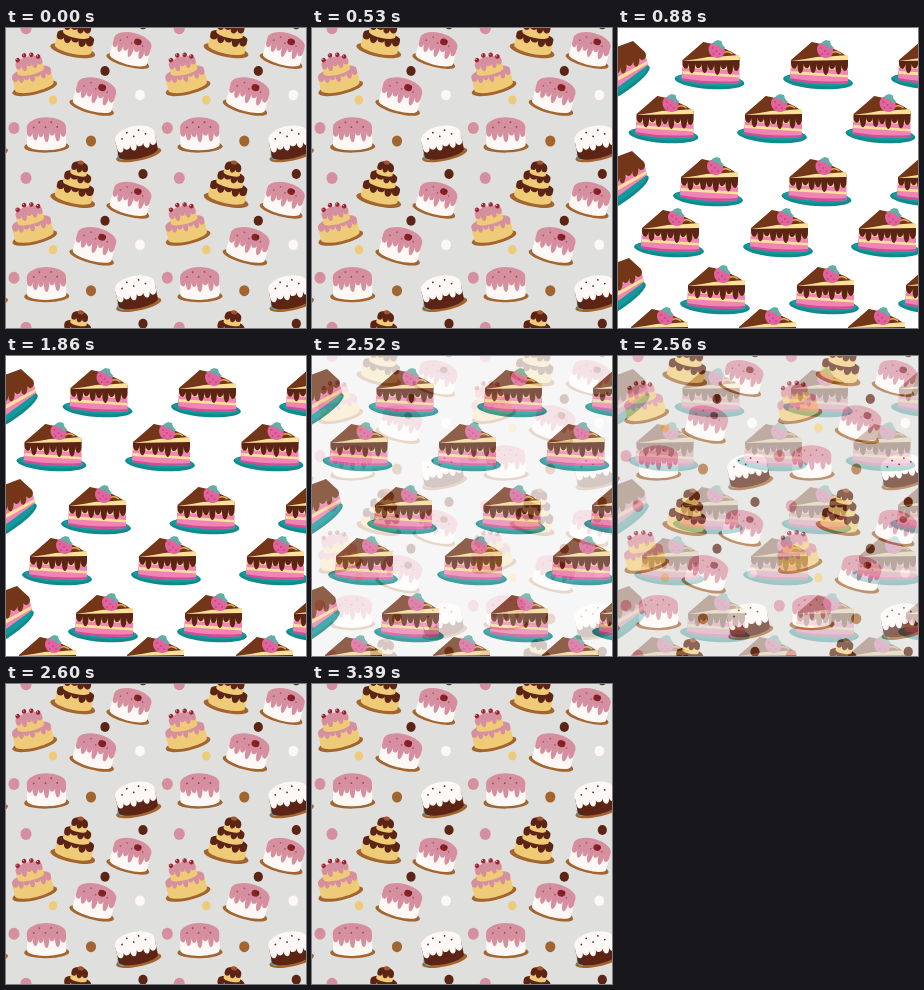
These frames come from a looping animation (300 by 300 pixels, 3920 ms). An HTML page:

```html
<!DOCTYPE html>
<html lang="en">
<head>
<meta charset="utf-8">
<title>Cakes</title>
<style>
html, body { margin: 0; width: 100%; height: 100%; overflow: hidden; background: #fff; }
svg { display: block; width: 100%; height: 100%; }
</style>
</head>
<body>
<svg id="stage" viewBox="0 0 300 300"></svg>
<script>
const PINK = '#d68f9f', CHOC = '#5c2414', GOLD = '#efcb78', WHITE = '#fdf8f5', PLATE = '#a3652f';
const COCOA = '#733619', CREAM = '#fbe19a', ROSE = '#f284b5', TEAL = '#129a9c';

const path = (d, fill) => `<path d="${d}" fill="${fill}"/>`;
const oval = (x, y, rx, ry, fill) => `<ellipse cx="${x}" cy="${y}" rx="${rx}" ry="${ry}" fill="${fill}"/>`;
const at = (x, y, turn, art, scale = 1) =>
  `<g transform="translate(${x} ${y}) rotate(${turn}) scale(${scale})">${art}</g>`;

// Row of soft drips running to the left; slope is the rise per drip.
const drips = (lengths, step, slope = 0) =>
  lengths.map(n => `c0 ${n} ${-step} ${n} ${-step} ${slope}`).join('');

// Cylinder side with a rounded lower edge.
const body = (w, top, bottom, fill) =>
  path(`M${-w} ${top}V${bottom}A${w} ${w * 0.28} 0 0 0 ${w} ${bottom}V${top}Z`, fill);

// Domed top with a short skirt that ends in drips.
const icing = (w, y, dome, skirt, lengths, fill) =>
  path(`M${-w} ${y}A${w} ${dome} 0 0 1 ${w} ${y}v${skirt}` +
    drips(lengths, 2 * w / lengths.length) + 'Z', fill);

const sprinkles = (fill, y) => [-13, -7, -1, 5, 11]
  .map((x, i) => oval(x, y + (i % 2 ? -3 : 2), 0.9, 0.9, fill)).join('');

const plate = (y, rx = 23) => oval(0, y, rx, 6, PLATE);
const cherry = (x, y) => oval(x, y, 2.2, 2.2, '#9c2335') + oval(x - 0.6, y - 0.8, 0.6, 0.6, '#efc1c8');

const tiered = plate(14, 22) +
  body(19, 0, 12, GOLD) + icing(19, -1, 6, 2, [5, 8, 4, 9, 5, 7, 4], PINK) +
  body(13, -12, -3, GOLD) + icing(13, -12, 5, 2, [4, 7, 3, 8, 4], PINK) +
  cherry(-10, -16) + cherry(-3, -19) + cherry(4, -18) + cherry(10, -15);

const tower = plate(15, 22) +
  body(18, 2, 13, GOLD) + icing(18, 1, 5, 3, [5, 8, 4, 7, 4], CHOC) +
  body(13, -9, -1, GOLD) + icing(13, -9, 5, 2, [4, 6, 3, 5], CHOC) +
  body(8, -17, -11, GOLD) + icing(8, -18, 5, 2, [3, 5, 3], CHOC) +
  oval(0, -22, 3, 2, '#a5532c');

const round = plate(13) + body(20, -5, 11, WHITE) +
  icing(20, -7, 10, 5, [7, 13, 5, 14, 7, 11, 6], PINK);

const berryCake = round + sprinkles('#a0586c', -8) +
  oval(5, -9, 4, 3.4, '#8a2026') + oval(7, -10, 1.3, 1, '#37362e');

const plainCake = round + sprinkles('#8d4a50', -9);

const whiteCake = plate(13) + oval(-17, 10, 4, 5, '#49b6b4') + body(20, -4, 11, CHOC) +
  icing(20, -6, 10, 8, [6, 8, 4, 8, 5, 7], WHITE) + sprinkles('#3f3836', -8);

const candy = [
  [8, 100, 6, PINK], [20, 150, 6, PINK], [85, 113, 5.5, PLATE], [99, 43, 5, CHOC],
  [137, 146, 5, CHOC], [47, 72, 4.6, GOLD], [134, 67, 5.3, WHITE]
].map(([x, y, r, fill]) => oval(x, y, r * 0.92, r, fill)).join('');

const cakeTile = candy +
  at(25.5, 46, -13, tiered, 1.04) + at(70, 157, 12, tower, 1.04) +
  at(89, 67, 15, berryCake) + at(125, 21, 15, berryCake, 0.96) +
  at(40.5, 106, -1, plainCake, 0.98) + at(130, 114, -12, whiteCake);

// Slice placed by its strawberry.
const strawberry =
  path('M-8 -1C-8 -9 3 -10 7 -4C10 2 7 8 1 8C-4 8 -8 4 -8 -1Z', '#e2639d') +
  path('M-3 -8L1 -10L5 -9L6 -5L9 -2L4 -1L2 -5L-2 -4Z', '#5fb0a6') +
  [[-4, -2], [0, 1], [-3, 4], [3, 4]].map(([x, y]) => oval(x, y, 0.8, 0.8, '#a83c78')).join('');

const dish = (rx, ry) => oval(0, 0, rx, ry, '#0f898c') + oval(0, -1, rx - 2, ry - 2, TEAL);

const slice = at(-7, 31, 4, dish(35, 8)) +
  path('M-34 12L23 13V33Q-8 36 -35 29Z', ROSE) +
  path('M-34 13L23 14V20L-34 18Z', CREAM) +
  path('M-34 21L23 25V27.5L-34 24Z', CREAM) +
  path('M-35 28Q-8 33 23 31V33Q-8 36 -35 30Z', '#cf4f97') +
  path('M-34 11L-13 -8Q6 -5 23 7V12Z', COCOA) +
  path('M-34 10.5Q-6 5 -2 7L23 5V12L-34 13Z', CREAM) +
  path('M-34 10L-13 -8L-3 6Q-18 9 -34 11Z', COCOA) +
  path('M-34 11L23 10V15' + drips([8, 13, 6, 14, 8, 12, 6, 13, 7], 57 / 9, -0.2) + 'Z', CHOC) +
  '<path d="M7 3Q11 0 16 4" fill="none" stroke="#e6ad4a" stroke-width="1.5"/>' + strawberry;

// Tilted slice cut by the left border.
const edgeSlice = at(0, 58, -32, dish(37, 9)) +
  path('M-4 36L27 24L30 37L-4 62Z', ROSE) +
  path('M-4 38L27 24L28 29L-4 45Z', CREAM) +
  path('M-4 51L29 33L29.5 36L-4 55Z', CREAM) +
  path('M-4 20L15 13L27 24L28 27' + drips([6, 11, 6, 12, 8], 6.4, 3) + 'Z', COCOA);

const slicePlaces = [
  [98.5, 22], [207, 22], [315, 22],
  [52.5, 76], [161, 76], [269.5, 76],
  [97, 139], [205.5, 139], [314, 139],
  [58, 190], [167, 190], [275, 190],
  [104, 247], [213, 247], [322, 247],
  [47, 289], [155, 289], [264, 289]
];
const edgePlaces = [[0, 0], [-1, 110], [-4, 217]];

const TILE_W = 153.3, TILE_H = 149.7;
let cakes = '';
for (let row = -1; row < 3; row++) {
  for (let col = -1; col < 2; col++) {
    cakes += `<use href="#tile" x="${col * TILE_W}" y="${row * TILE_H}"/>`;
  }
}
const slices = edgePlaces.map(([x, y]) => at(x, y, 0, edgeSlice)).join('') +
  slicePlaces.map(([x, y]) => `<use href="#slice" x="${x}" y="${y}"/>`).join('');

document.getElementById('stage').innerHTML =
  `<defs><g id="tile">${cakeTile}</g><g id="slice">${slice}</g></defs>
  <rect width="300" height="300" fill="#fff"/>${slices}
  <g id="cakes"><rect width="300" height="300" fill="#dfdfdd"/>${cakes}</g>`;

const cakeLayer = document.getElementById('cakes');
const LOOP = 3920;

// Cakes cut to slices, then return in two blended steps.
function draw(t) {
  let opacity = 1;
  if (t >= 880 && t < 2520) opacity = 0;
  else if (t >= 2520 && t < 2560) opacity = 0.25;
  else if (t >= 2560 && t < 2600) opacity = 0.7;
  cakeLayer.setAttribute('opacity', opacity);
}

const start = performance.now();
function tick() {
  draw((performance.now() - start) % LOOP);
  requestAnimationFrame(tick);
}
tick();
</script>
</body>
</html>
```
